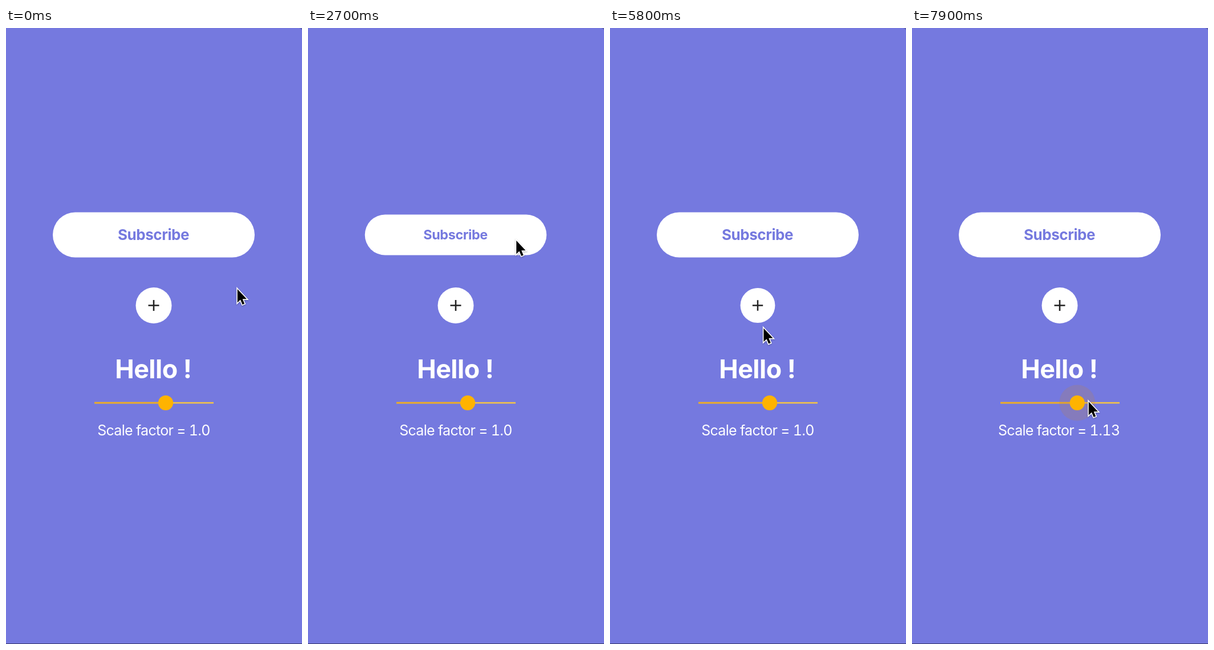
These frames come from a looping animation (519 by 1078 pixels, 8000 ms). An HTML page:

```html
<!DOCTYPE html>
<html lang="en">
<head>
<meta charset="utf-8">
<title>Button and slider</title>
<style>
  html, body { margin: 0; width: 100%; height: 100%; overflow: hidden; background: #7579df; }
  svg { display: block; width: 100%; height: 100%; }
  text { font-family: Inter, "Open Sans", sans-serif; text-anchor: middle; fill: #fff; }
  .bold { font-weight: 700; }
  #label { font-variant-numeric: tabular-nums; }
  #cursor { filter: drop-shadow(0 1.5px 1.2px rgba(0, 0, 0, .3)); }
</style>
</head>
<body>
<svg viewBox="0 0 519 1078">
  <rect width="519" height="1078" fill="#7579df"/>
  <path d="M514 0H519V4Q518 1 514 0Z" fill="#5c5fae"/>
  <rect y="1077" width="519" height="1" fill="#35376a"/>

  <g id="pill">
    <rect x="82" y="322.5" width="354" height="79" rx="39.5" fill="#fff"/>
    <text class="bold" x="258.5" y="371" font-size="26" letter-spacing="-.45" style="fill:#7579df">Subscribe</text>
  </g>

  <g id="plus">
    <circle cx="259" cy="485.5" r="31.5" fill="#fff"/>
    <path d="M249.5 485.5h19M259 476v19" stroke="#222" stroke-width="2.6"/>
  </g>

  <text class="bold" x="258.3" y="613" font-size="44.8" letter-spacing="-.5">Hello !</text>

  <path d="M155 656H364" stroke="#f6c544" stroke-width="2.6"/>
  <path id="filled" stroke="#eeac1f" stroke-width="2.6"/>
  <circle id="halo" cy="656" fill="#c08030" fill-opacity=".2"/>
  <circle id="thumb" cy="656" r="13.1" fill="#ffb300"/>
  <text id="label" y="712.5" font-size="25" letter-spacing="-.7"></text>

  <path id="cursor" d="M1.8 4V27.5L7 22.6L10.6 31L14.2 29.5L10.7 21.3H18Z"
    fill="#000" stroke="#fff" stroke-width="3.2" paint-order="stroke"/>
</svg>
<script>
const LOOP = 8000, STEP = 100, RAMP = 300;
const $ = id => document.getElementById(id);
const progress = (t, start, length) => Math.min(1, Math.max(0, (t - start) / length));
const smooth = k => k * k * (3 - 2 * k);

// Each move eases to a resting point; bend pulls its path off the straight line.
const home = [404, 453];
const moves = [
  { start: 0, length: 700, to: [363.5, 368], bend: [0, 0] },
  { start: 2900, length: 800, to: [262, 467.5], bend: [-7, 22] },
  { start: 5500, length: 700, to: [252, 583], bend: [10, 9] },
  { start: 6400, length: 900, to: [291, 648], bend: [16, -18] },
  { start: 7500, length: 400, to: [308, 650], bend: [0, 0] }
];

// Button presses as [down, up] times
const pillPresses = [[950, 1700], [2400, 2800]];
const plusPresses = [[3950, 4400], [5200, 5600]];

function pointerAt(t) {
  return moves.reduce((from, { start, length, to, bend }) => {
    const k = smooth(progress(t, start, length));
    return from.map((v, i) => v + (to[i] - v) * k + bend[i] * 4 * k * (1 - k));
  }, home);
}

function pressScale(t, presses) {
  return presses.reduce((scale, [down, up]) =>
    scale - 0.1 * (progress(t, down, RAMP) - progress(t, up, RAMP)), 1);
}

function scaleAround(id, y, scale) {
  $(id).setAttribute("transform", `translate(259 ${y}) scale(${scale}) translate(-259 ${-y})`);
}

function draw(t) {
  scaleAround("pill", 362, pressScale(t, pillPresses));
  scaleAround("plus", 485.5, pressScale(t, plusPresses));

  const dragged = t >= 7500;
  const thumbX = dragged ? 289.7 : 280;
  $("filled").setAttribute("d", `M155 656H${thumbX}`);
  $("thumb").setAttribute("cx", thumbX);
  $("halo").setAttribute("cx", thumbX);
  $("halo").setAttribute("r", 31.5 * progress(t, 7400, 200));
  $("label").setAttribute("x", dragged ? 257.6 : 259);
  $("label").textContent = `Scale factor = ${dragged ? "1.13" : "1.0"}`;

  $("cursor").setAttribute("transform", `translate(${pointerAt(t)})`);
}

const began = performance.now();
function tick() {
  const t = (performance.now() - began) % LOOP;
  draw(Math.floor(t / STEP) * STEP);
  requestAnimationFrame(tick);
}
tick();
</script>
</body>
</html>
```
